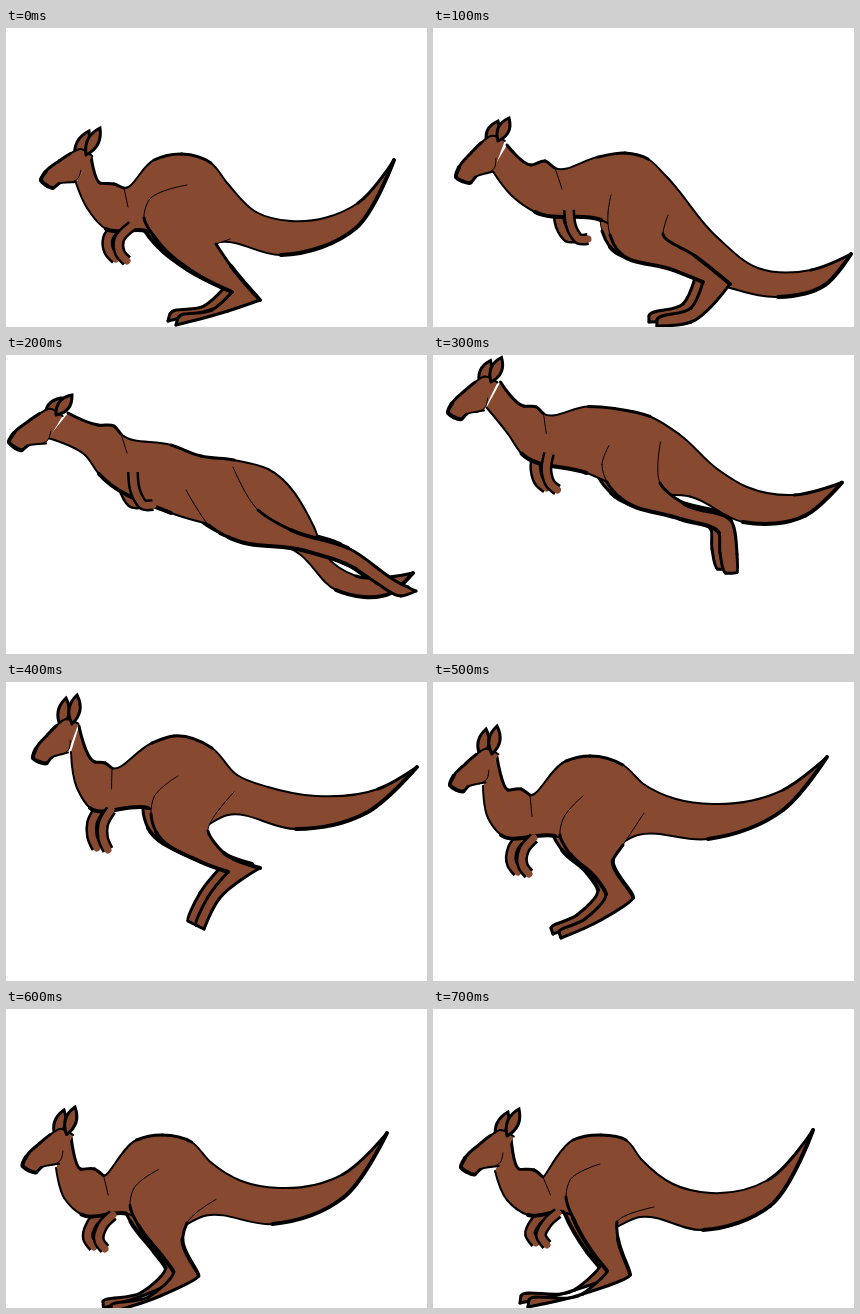
These frames come from a looping animation (421 px wide and 299 px high, 0.8 s). An HTML page with a canvas:

```html
<!DOCTYPE html>
<html lang="en">
<head>
<meta charset="utf-8">
<title>Hopping kangaroo</title>
<style>
html, body { margin: 0; width: 100%; height: 100%; overflow: hidden; background: #fff; }
canvas { display: block; }
</style>
</head>
<body>
<canvas id="stage" width="421" height="299"></canvas>
<script>
const ctx = document.getElementById('stage').getContext('2d');
const FUR = '#874a31', INK = '#000';

const points = text => text.split(' ').map(p => p.split(',').map(Number));

// Joints of one pose.
// head: ear base, ear tip, nose; torso: nape, back, tail, belly, throat;
// leg: thigh, shin, foot, heel, hock; arm: shoulder to paw
const pose = (head, torso, leg, arm) => [head, torso, leg, arm].map(points);

const crouch = pose('80,127 94,100 35,152',
  '85,128 94,155 108,156 118,160 148,132 176,126 205,135 222,156 250,184 285,193 352,175 388,132 350,200 275,227 214,214 180,225 140,203 100,201 81,180 70,155',
  '181,157 143,172 138,190 147,207 190,246 226,264 206,282 172,290 170,297 222,283 254,272 225,238 210,216 224,211',
  '126,198 113,212 114,225 121,233');
const push = pose('65,113 76,90 23,149',
  '74,117 98,137 112,133 122,140 165,129 192,125 215,131 232,147 285,210 325,240 378,242 418,226 392,257 345,269 297,260 230,235 168,192 102,184 79,168 59,142',
  '178,167 175,185 177,207 185,223 240,242 270,254 258,280 224,292 224,298 258,294 297,256 262,228 230,206 235,187',
  '136,182 140,203 146,211 155,211');
const stretch = pose('50,60 66,40 3,87',
  '62,58 92,70 108,71 115,79 165,90 195,101 228,105 262,114 308,172 318,198 350,221 407,218 385,238 330,235 292,198 225,175 165,158 93,119 79,100 42,83',
  '180,135 190,152 203,170 222,182 300,196 350,214 372,229 395,241 410,236 395,229 342,193 285,175 252,155 227,112',
  '127,117 130,138 138,150 147,150');
const tuck = pose('66,42 71,13 27,76',
  '73,44 89,80 99,81 106,86 146,61 168,54 206,66 231,93 262,105 310,114 372,107 411,85 360,131 290,147 222,133 185,150 142,126 84,126 71,106 65,70',
  '172,94 148,115 145,132 150,150 195,180 222,190 202,215 190,243 198,247 213,217 254,186 218,171 202,149 228,110',
  '105,128 97,143 97,156 102,168');
const fall = pose('59,72 64,44 17,103',
  '64,75 75,108 88,107 97,113 133,79 157,74 190,83 212,103 243,117 280,122 350,108 394,75 350,128 275,157 205,153 165,172 122,154 68,153 55,136 50,104',
  '150,114 130,137 127,153 137,172 162,195 173,212 152,237 126,250 128,256 168,238 200,216 180,178 190,163 211,131',
  '101,156 91,168 90,184 96,192');
const land = pose('74,127 86,100 28,158',
  '78,128 86,160 101,161 110,168 140,131 168,126 193,131 209,151 240,175 278,184 335,171 380,121 337,197 270,221 207,208 170,222 130,203 95,206 74,191 62,162',
  '167,155 137,171 133,188 140,209 162,247 174,262 145,287 96,291 95,298 150,285 197,266 185,230 184,213 221,198',
  '125,204 114,214 108,227 114,236');

// Head outline along and across the line from ear base to nose
const HEAD = points('-5,4 2,-8 13,-9 26,-8 44,-5 52,0 50,7 45,13 38,12 28,16 22,19');
const CHEEK = points('12,11 19,17 26,17');

const shift = (pts, dx, dy) => pts.map(([x, y]) => [x + dx, y + dy]);
const mix = (a, b, k) => a.map((v, i) => v + (b[i] - v) * k);
const between = (a, b, dx, dy) =>
  a.map((part, i) => shift(part.map((p, j) => mix(p, b[i][j], 0.5)), dx, dy));

const POSES = [crouch, push, stretch, between(stretch, tuck, 0, -24),
  tuck, fall, between(fall, land, -6, 26), land];

// Tangents of the circle through three neighbours, vanishing at sharp corners
function tangents(pts) {
  return pts.map((p, i) => {
    if (!i || i === pts.length - 1) return [0, 0];
    const [ax, ay] = [p[0] - pts[i - 1][0], p[1] - pts[i - 1][1]];
    const [bx, by] = [pts[i + 1][0] - p[0], pts[i + 1][1] - p[1]];
    const a = Math.hypot(ax, ay), b = Math.hypot(bx, by);
    const tx = ax / a * b + bx / b * a, ty = ay / a * b + by / b * a;
    const soft = 0.36 * Math.sqrt(Math.max(0, (ax * bx + ay * by) / (a * b)));
    const k = soft / (Math.hypot(tx, ty) || 1);
    return [tx * k, ty * k];
  });
}

// One smooth path per segment, or one for the whole line
function curve(path, pts, from = 0, to = pts.length - 1) {
  const tan = tangents(pts);
  path.moveTo(...pts[from]);
  for (let i = from; i < to; i++) {
    const [x, y] = pts[i], [u, v] = pts[i + 1], d = Math.hypot(u - x, v - y);
    path.bezierCurveTo(x + tan[i][0] * d, y + tan[i][1] * d,
      u - tan[i + 1][0] * d, v - tan[i + 1][1] * d, u, v);
  }
  return path;
}

function stroke(path, width, colour = INK, cap = 'round') {
  ctx.lineWidth = width;
  ctx.strokeStyle = colour;
  ctx.lineCap = cap;
  ctx.stroke(path);
}

// Filled shape; each digit is the line width of one segment
function shape(pts, widths) {
  ctx.fill(curve(new Path2D(), pts));
  [...widths].forEach((w, i) => stroke(curve(new Path2D(), pts, i, i + 1), +w));
}

function ear([x, y], [u, v]) {
  const d = Math.hypot(u - x, v - y), mx = (x + u) / 2, my = (y + v) / 2;
  const nx = (v - y) / d * 11, ny = (x - u) / d * 11;
  const leaf = new Path2D();
  leaf.moveTo(x, y);
  leaf.quadraticCurveTo(mx + nx, my + ny, u, v);
  leaf.quadraticCurveTo(mx - nx, my - ny, x, y);
  ctx.fill(leaf);
  stroke(leaf, 3);
}

function arm(joints) {
  const path = curve(new Path2D(), joints);
  stroke(path, 12, INK, 'butt');
  stroke(path, 7, FUR);
}

function kangaroo([head, torso, leg, joints]) {
  const [base, tip, nose] = head;
  const ux = (nose[0] - base[0]) / 52, uy = (nose[1] - base[1]) / 52;
  const onHead = pts => pts.map(([a, b]) => [base[0] + a * ux + b * uy, base[1] + a * uy - b * ux]);
  const limb = '1134433333431';

  ear(...shift([base, tip], -11, 3));
  shape(shift(leg, -8, -4), limb);
  arm(shift(joints, -11, -2));
  shape(torso, '3332332222344222422');
  shape(leg, limb);
  shape(onHead(HEAD), '2233444322');
  stroke(curve(new Path2D(), onHead(CHEEK)), 1);
  ear(base, tip);
  stroke(curve(new Path2D(), [torso[3], mix(torso[3], joints[0], 0.5)]), 1);
  arm(joints);
}

function draw() {
  ctx.fillStyle = '#fff';
  ctx.fillRect(0, 0, 421, 299);
  ctx.fillStyle = FUR;
  kangaroo(POSES[Math.floor(performance.now() / 100) % POSES.length]);
  requestAnimationFrame(draw);
}
draw();
</script>
</body>
</html>
```
